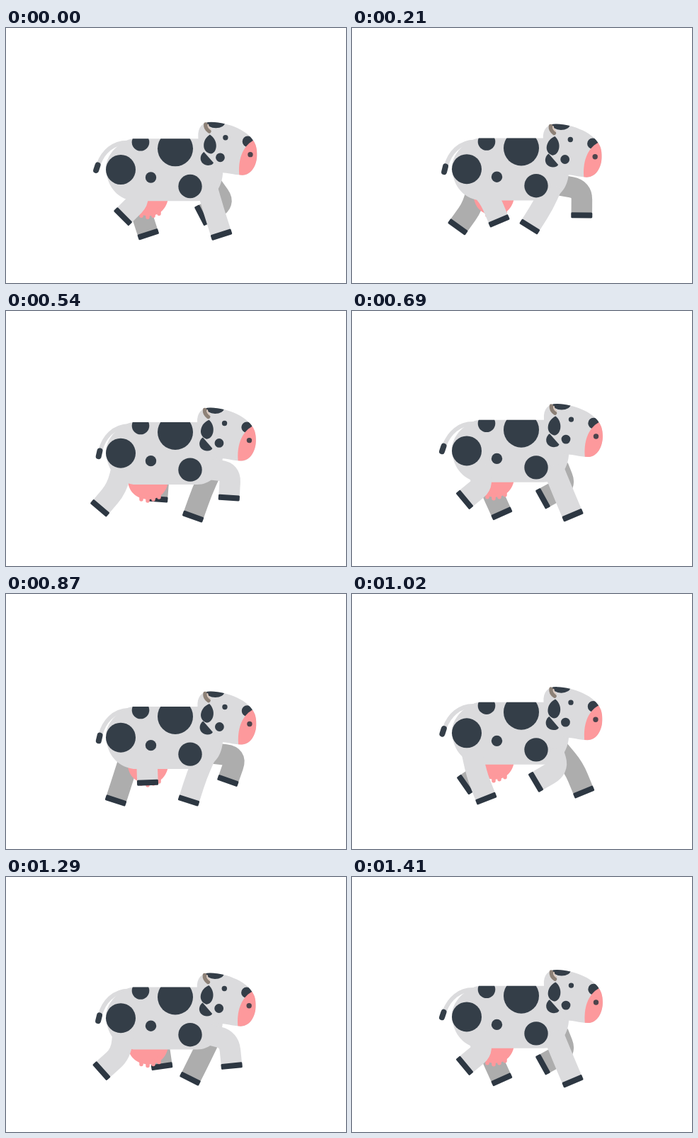
Animation, 480 px wide and 360 px high, one loop 1.44 s. Source, as an HTML page:

```html
<!DOCTYPE html>
<html lang="en">
<head>
<meta charset="utf-8">
<title>Walking cow</title>
<style>
  html, body { margin: 0; width: 100%; height: 100%; overflow: hidden; background: #fff; }
  svg { display: block; width: 480px; height: 360px; }
  .skin { fill: #dbdbdd; }
  .dark { fill: #343e48; }
  .pink { fill: #fd999c; }
  .hoof { fill: #2d3742; }
  .limb { fill: none; stroke: #dbdbdd; stroke-width: 29.5; }
  .far .limb { stroke: #adadad; }
  .line { fill: none; stroke-linecap: round; }
</style>
</head>
<body>
<svg viewBox="0 0 480 360">
  <defs>
    <clipPath id="back"><rect x="120" y="0" width="200" height="100"/></clipPath>
    <clipPath id="skull"><use href="#face"/></clipPath>
  </defs>

  <g id="farHind" class="far"></g>
  <g id="farFront" class="far"></g>

  <g class="bob">
    <g id="tail">
      <path class="line" stroke="#dbdbdd" stroke-width="6" d="M174 5.500C151 4 137 19 130.500 36"/>
      <path class="line" stroke="#343e48" stroke-width="8" d="M129.500 37L127 44.500"/>
    </g>
    <path class="pink" d="M172 84H229C227 98 217 109 202 109C186 109 174 100 172 84Z"/>
    <path class="line" stroke="#fd999c" stroke-width="5.500" d="M191 104v5M200 106v5M208 104v5M216 100v6"/>
    <path class="skin" d="M182 0H275C300 0 306 25 306 50C304 75 287 88 270 88H180C154 84 141.500 64 141 40C142 26 152 14 160 9S172 0 182 0Z"/>
  </g>

  <g id="hind"></g>
  <g id="front"></g>

  <g class="bob">
    <g class="dark" clip-path="url(#back)">
      <circle cx="162" cy="43.700" r="21"/>
      <circle cx="204.500" cy="54.700" r="7.700"/>
      <circle cx="260" cy="67.200" r="16.700"/>
      <circle cx="190" cy="5" r="12.300"/>
      <circle cx="239" cy="14" r="25"/>
    </g>
    <g id="head">
      <path id="face" class="skin" d="M270 0C269-15 277-22 289-21.500C312-21 344-9 351 11C357 30 349 53.500 332 53.500C318 53 312 50 303 50C285 49 271 25 270 0Z"/>
      <g clip-path="url(#skull)">
        <ellipse class="dark" cx="295" cy="-21" rx="13" ry="8"/>
        <circle class="dark" cx="340" cy="6" r="7.700"/>
        <path class="pink" d="M349 4C334 11 325 30 328 56H360V4Z"/>
      </g>
      <circle class="dark" cx="308.500" cy="0.500" r="3.700"/>
      <circle class="dark" cx="301" cy="28.500" r="6.400"/>
      <circle fill="#4d444c" cx="343.500" cy="24.500" r="3.700"/>
      <path class="dark" d="M278 20.500C270 26 272 39 284 39.500Q290 39.500 291.500 36Z"/>
      <path id="ear" class="dark" d="M286.500-4C291-1 295 6 294 13C293 20 289 23 285.500 23C280 22 276 17 276.500 11C277 4 281-1 286.500-4Z"/>
      <path class="line" stroke="#8d8177" stroke-width="5.500" d="M280.500-18.500C280-14 282-11 285.500-8.500"/>
      <path class="line" stroke="#dccabf" stroke-width="1.800" d="M284-18C284-15 285.500-13 287.500-11.500"/>
    </g>
  </g>
</svg>
<script>
const CYCLE = 720, STEP = CYCLE / 2, SHIN = 41;

// Sum of harmonics: each has an amplitude and the time of its peak
const swing = (t, period, mean, ...harmonics) => harmonics.reduce(
  (sum, [amp, peak], i) => sum + amp * Math.cos((i + 1) * (t - peak) / period * 2 * Math.PI), mean);
const stride = (t, ...shape) => swing(t, CYCLE, ...shape);
const bounce = (t, ...shape) => swing(t, STEP, ...shape);

// Hoof position and shin angle through one stride
const frontStride = t => ({
  x: stride(t, 285.2, [36.3, 600], [2.5, 333]),
  y: stride(t, 280.1, [17.2, 67], [4.1, 76], [2, 180]),
  angle: stride(t, -17.6, [39.5, 682], [4.4, 210], [3.5, 203])
});
const hindStride = t => ({
  x: stride(t, 166.5, [37.3, 193], [5.3, 252], [1.8, 215]),
  y: stride(t, 280.9, [16.5, 392], [4.7, 32]),
  angle: stride(t, -16.3, [39.2, 275], [3.6, 211], [3, 236])
});

const legs = [
  { id: 'farHind', walk: hindStride, lead: 315, shift: 17, hipX: 180, hipY: 55 },
  { id: 'farFront', walk: frontStride, lead: 340, shift: 8, hipX: 291, hipY: 66 },
  { id: 'hind', walk: hindStride, lead: 0, shift: 0, hipX: 166, hipY: 55 },
  { id: 'front', walk: frontStride, lead: 0, shift: 0, hipX: 283, hipY: 66 }
];

const $ = id => document.getElementById(id);
const place = (el, transform) => el.setAttribute('transform', transform);
const bobs = document.querySelectorAll('.bob');

for (const leg of legs) {
  $(leg.id).innerHTML = '<path class="limb"/><rect class="hoof" x="-15" y="-8" width="30" height="8" rx="1.5"/>';
}

function drawLeg({ id, walk, lead, shift, hipX, hipY }, t, top) {
  const foot = walk(t + lead), x = foot.x + shift, y = foot.y, hy = top + hipY;
  const r = foot.angle * Math.PI / 180;
  const upShin = d => [x - d * Math.sin(r), y - d * Math.cos(r)];
  const [kx, ky] = upShin(SHIN);
  const bend = [kx + (hipX - kx) * .45, ky + (hy - ky) * .45];
  const [limb, hoof] = $(id).children;
  limb.setAttribute('d', `M${hipX} ${hy}L${bend}Q${kx} ${ky} ${upShin(26)}L${upShin(4)}`);
  place(hoof, `translate(${x} ${y}) rotate(${-foot.angle})`);
}

function draw() {
  const t = performance.now() % (2 * CYCLE);
  const top = bounce(t, 157.2, [4.7, 95], [.9, 65]);
  const nod = bounce(t, 0, [1, 45]);
  const ear = bounce(t, -2.5, [12, 225], [7.6, 147], [3.5, 114]);
  const wag = bounce(t, -2.8, [-2.8, 160]);

  for (const g of bobs) place(g, `translate(0 ${top})`);
  place($('head'), `translate(${.7 + nod} ${-.5 - 2 * nod}) rotate(${-.3 * nod} 285 15)`);
  place($('ear'), `rotate(${ear} 287 -3)`);
  place($('tail'), `rotate(${wag} 168 7)`);
  for (const leg of legs) drawLeg(leg, t, top);
  requestAnimationFrame(draw);
}
draw();
</script>
</body>
</html>
```
